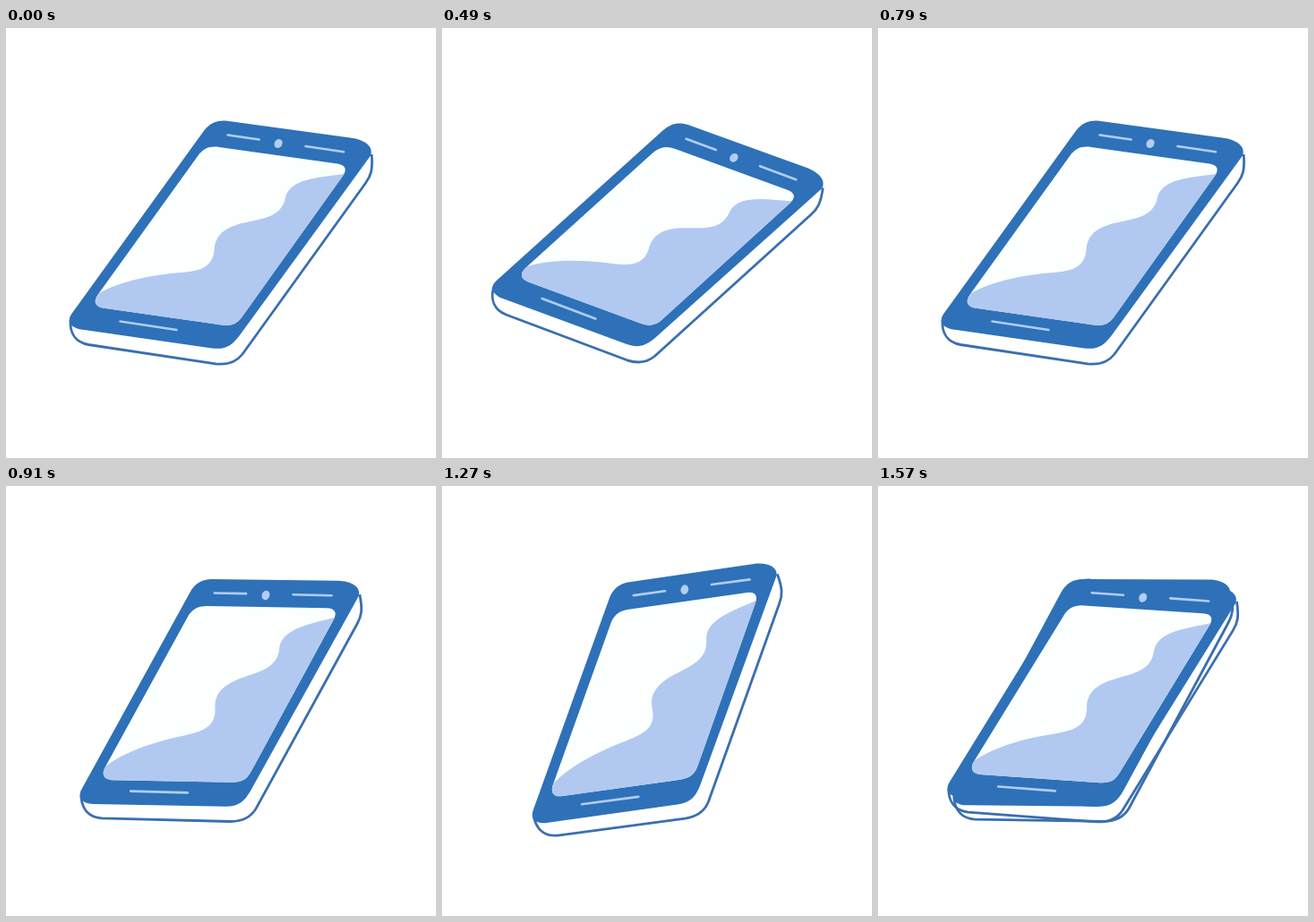
Recreate the animation shown at these times as an HTML page. Size 480x480 px, loop 1.63 s.

```html
<!DOCTYPE html>
<html lang="en">
<head>
<meta charset="utf-8">
<title>Swinging phone</title>
<style>
  html, body { margin: 0; width: 100%; height: 100%; overflow: hidden; background: #fff; }
  svg { display: block; width: 100%; height: 100%; }
  .edge { stroke: #3a6fae; stroke-width: 2.8; stroke-linejoin: round; }
  .blue { fill: #2e71b8; }
  .bars { stroke: #b1cdf2; stroke-width: 2.6; stroke-linecap: round; fill: none; }
</style>
</head>
<body>
<svg viewBox="0 0 480 480">
  <defs>
    <path id="rim" d="M72 326 C71 341 78 351 92 353.5 L234 374.8 C248 376.5 257 373 264 364 L401.5 173 C407.5 165 409.5 158 408.2 141"/>
    <path id="case" d="M247 103.8 L386 122.8 C401 125 411 133 407 142.5 L260.5 343.5 C252 354.5 245 359.5 230 357.4 L84 336.6 C72 334.5 67 327 74 318 L220 116 C227 106 236 102.3 247 103.8Z"/>
    <path id="screen" d="M238 133 L370 151.5 C379 153 381 158 376 165 L264.5 321 C258.5 330 252 333 241 331.5 L108 312.5 C99.5 311 97 305 103 297 L214 143 C220.5 134 227.5 131.5 238 133Z"/>
    <clipPath id="glass"><use href="#screen"/></clipPath>
  </defs>
  <g id="base"><use href="#rim" class="edge" fill="#fff"/></g>
  <g id="trail">
    <use href="#rim" class="edge" fill="none"/>
    <use href="#case" class="blue"/>
  </g>
  <g id="face">
    <use href="#case" class="blue"/>
    <use href="#screen" fill="#fbfffe"/>
    <path clip-path="url(#glass)" fill="#b1c9f1" d="M384 162 C350 167 318 167 312 189 C308 209 292 212 270 216.5 C247 221 234 229 232.5 247 C231 266 219 271 196 273 C158 276 122 284 99 299 L90 330 L250 345 L400 165Z"/>
    <path class="bars" d="M247.5 119.5 L282.5 124.5 M334.5 132 L377 138.3 M127.5 327.5 L190.5 337"/>
    <ellipse cx="304" cy="129" rx="4.3" ry="5.3" transform="rotate(30 304 129)" fill="#b1cdf2"/>
  </g>
</svg>
<script>
  const LOOP = 1630, STEP = 60, MIDDLE = 790, LAST = 1570;
  const [base, trail, face] = ['base', 'trail', 'face'].map(id => document.getElementById(id));

  // Clockwise half swing first, then a wider counter-clockwise one.
  function angle(t) {
    return t < MIDDLE
      ? 13 * Math.sin(Math.PI * t / MIDDLE)
      : -16.4 * Math.sin(Math.PI * (t - MIDDLE) / 850);
  }

  // The pose is held in steps, with a longer rest at the first peak.
  function hold(t) {
    if (t < 490) return Math.min(Math.floor(t / STEP) * STEP, 360);
    return Math.floor((t - 10) / STEP) * STEP + 10;
  }

  function turn(el, deg) {
    el.setAttribute('transform', `rotate(${deg.toFixed(3)} 240 240)`);
  }

  // The last step keeps the previous pose visible behind the phone.
  function draw(ms) {
    const t = hold(ms % LOOP);
    turn(base, angle(t));
    turn(face, angle(t));
    turn(trail, angle(t - STEP));
    trail.setAttribute('visibility', t >= LAST ? 'visible' : 'hidden');
  }

  const start = performance.now();
  function tick() {
    draw(performance.now() - start);
    requestAnimationFrame(tick);
  }
  tick();
</script>
</body>
</html>
```
